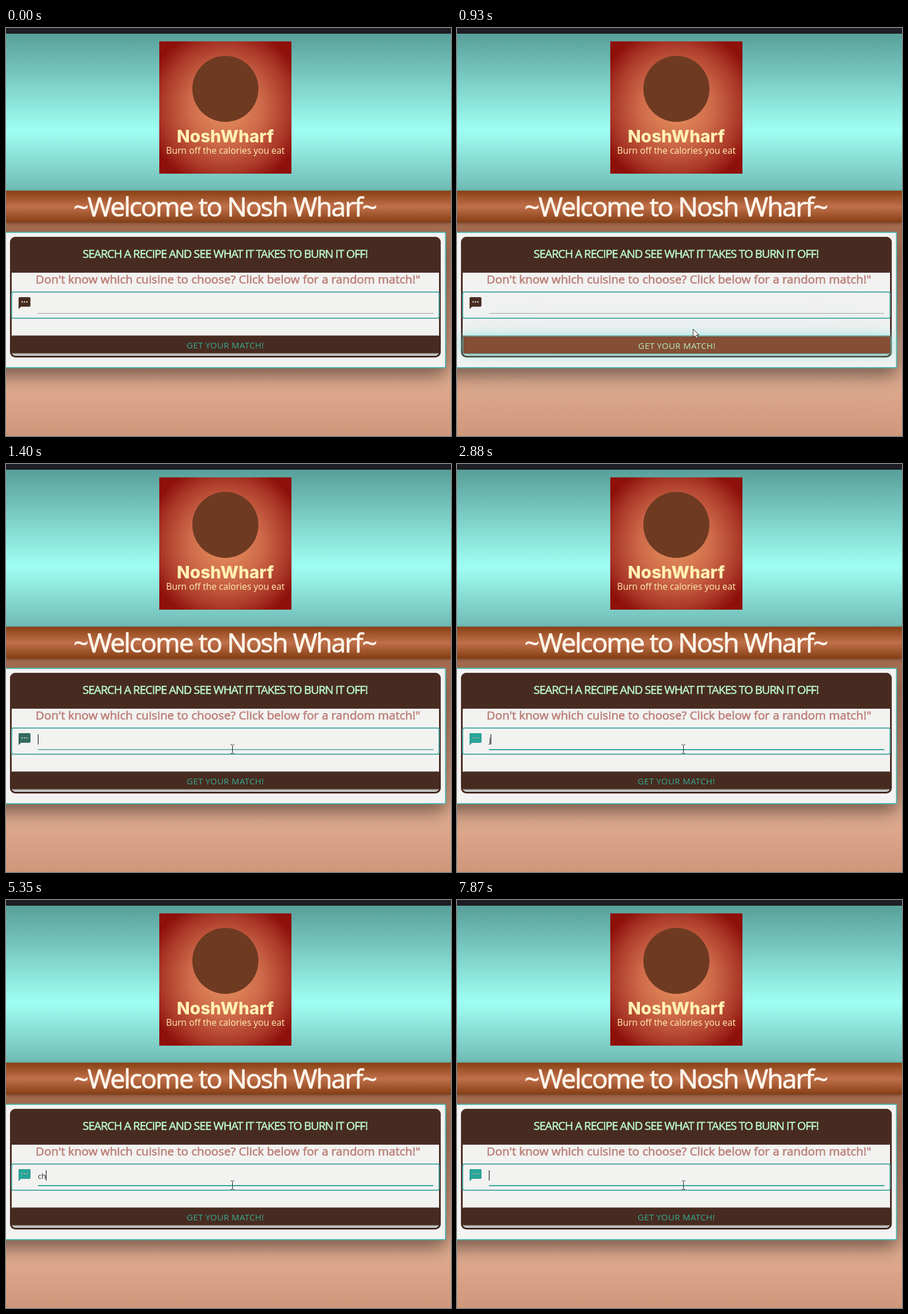
Recreate the animation shown at these times as an HTML page. Size 781 px wide and 717 px high, loop 8000 ms.

```html
<!DOCTYPE html>
<html lang="en">
<head>
<meta charset="utf-8">
<title>Recipe search</title>
<style>
  html, body { margin: 0; width: 100%; height: 100%; overflow: hidden; }
  body { position: relative; font-family: "Open Sans", "Noto Sans", sans-serif; }
  svg { display: block; }
  text { white-space: pre; }
  .mid { text-anchor: middle; }
  #pop {
    position: absolute; top: 443px; height: 30px; box-sizing: border-box;
    display: none; align-items: center; gap: 24px; padding: 0 13px 0 16px;
    border-radius: 5px; background: #f8f8f8; color: #1b1b1b;
    box-shadow: 0 2px 7px #0004; font-size: 11.6px; white-space: nowrap;
  }
  #pop small { font-size: 9px; }
</style>
</head>
<body>
<svg id="stage" width="781" height="717" viewBox="0 0 781 717">
  <defs>
    <linearGradient id="sky" x2="0" y2="1">
      <stop stop-color="#589f9a"/><stop offset=".615" stop-color="#a0fff4"/><stop offset="1" stop-color="#6fbab4"/>
    </linearGradient>
    <linearGradient id="bar" x2="0" y2="1">
      <stop stop-color="#884012"/><stop offset=".5" stop-color="#c0704b"/><stop offset="1" stop-color="#843e12"/>
    </linearGradient>
    <linearGradient id="clay" x2="0" y2="1">
      <stop stop-color="#a2694d"/><stop offset=".74" stop-color="#e1ac90"/><stop offset="1" stop-color="#cf967a"/>
    </linearGradient>
    <radialGradient id="ember" gradientUnits="userSpaceOnUse" cx="385" cy="140" r="142">
      <stop stop-color="#e8955f"/><stop offset=".45" stop-color="#ce6a4a"/>
      <stop offset=".78" stop-color="#ac3a29"/><stop offset="1" stop-color="#8e100b"/>
    </radialGradient>
    <filter id="soft" x="-30%" y="-50%" width="160%" height="200%"><feGaussianBlur stdDeviation="16"/></filter>
    <filter id="near" filterUnits="userSpaceOnUse" x="-80" y="440" width="940" height="240"><feGaussianBlur stdDeviation="11"/></filter>
    <filter id="far" filterUnits="userSpaceOnUse" x="-250" y="250" width="1300" height="600"><feGaussianBlur stdDeviation="65"/></filter>
    <filter id="thin" x="-5%" y="-30%" width="110%" height="180%"><feGaussianBlur stdDeviation="2"/></filter>
    <clipPath id="round"><circle cx="720" cy="524" r="17.5"/></clipPath>
    <path id="chat" transform="translate(20 471) scale(1.04)" d="M20 2H4c-1.1 0-2 .9-2 2v18l4-4h14c1.1 0 2-.9 2-2V4c0-1.1-.9-2-2-2zM9 11H7V9h2zm4 0h-2V9h2zm4 0h-2V9h2z"/>
  </defs>

  <!-- header -->
  <rect y="342" width="781" height="375" fill="url(#clay)"/>
  <rect y="10" width="781" height="276" fill="url(#sky)"/>
  <rect width="781" height="10" fill="#1c1e23"/>
  <rect x="269" y="23.5" width="232" height="232.5" fill="url(#ember)"/>
  <circle cx="385" cy="107" r="58" fill="#6e3a22"/>
  <g class="mid" fill="#fff0b3">
    <text x="385" y="201" font-family="Inter, sans-serif" font-weight="800" font-size="30">NoshWharf</text>
    <text x="385" y="221" font-size="15.8">Burn off the calories you eat</text>
  </g>
  <rect y="286" width="781" height="58" fill="#0004" filter="url(#thin)"/>
  <rect y="286" width="781" height="56" fill="url(#bar)"/>
  <text class="mid" x="384" y="331" font-size="46.3" letter-spacing="-2" fill="#fff7ec" stroke="#fff7ec" stroke-width=".9">~Welcome to Nosh Wharf~</text>

  <!-- card -->
  <rect x="-40" y="380" width="812" height="232" fill="#000" opacity=".45" filter="url(#soft)"/>
  <rect x="-9" y="359" width="780.5" height="238" rx="2" fill="#f3f3f2" stroke="#50b0aa" stroke-width="2"/>
  <rect x="8.5" y="368.5" width="753" height="209" rx="8" fill="#f2f2f1" stroke="#482a1f" stroke-width="3"/>
  <path d="M7 430V377a10 10 0 0 1 10-10H753a10 10 0 0 1 10 10V430z" fill="#482b20"/>
  <text class="mid" x="384.5" y="404" font-size="20" letter-spacing="-1" fill="#b9f6ca" stroke="#b9f6ca" stroke-width=".6">SEARCH A RECIPE AND SEE WHAT IT TAKES TO BURN IT OFF!</text>
  <text class="mid" x="389.5" y="449" font-size="20.65" fill="#bd8079" stroke="#bd8079" stroke-width=".7">Don't know which cuisine to choose? Click below for a random match!"</text>
  <rect x="10" y="464" width="750" height="46" rx="3" fill="none" stroke="#55aca6" stroke-width="2"/>
  <use href="#chat" fill="#482b20"/>
  <path d="M56 501.5H750" stroke="#9e9ea6"/>
  <g id="focus">
    <use href="#chat" fill="#26a69a"/>
    <path d="M56 502H750" stroke="#33a79c" stroke-width="2"/>
  </g>
  <text id="typed" x="56" y="490" font-size="13" fill="#222"></text>
  <path id="caret" d="M0 475V493" stroke="#000"/>

  <!-- button -->
  <rect x="10" y="543" width="751" height="31" rx="3" fill="#0006" filter="url(#thin)"/>
  <rect x="9" y="540.5" width="752" height="31" rx="3" fill="#482b20"/>
  <text id="label" class="mid" x="385" y="563" font-size="15" letter-spacing=".4" fill="#35ab92">GET YOUR MATCH!</text>
  <g id="hover">
    <rect x="10" y="541" width="752" height="31" fill="#a8d4ee" opacity=".28" filter="url(#far)"/>
    <rect x="10" y="541" width="752" height="31" fill="#74e6dc" opacity=".85" filter="url(#near)"/>
    <rect x="10.5" y="541.5" width="751" height="31" rx="3" fill="#8a5137" stroke="#5fbcae"/>
    <text class="mid" x="386" y="564" font-size="15" letter-spacing=".4" fill="#b9f6ca">GET YOUR MATCH!</text>
  </g>

  <!-- suggestion list -->
  <g id="list">
    <rect x="56" y="505" width="694" height="42" fill="#0006" filter="url(#thin)"/>
    <rect x="56" y="503" width="694" height="42.5" fill="#fff"/>
    <text x="69.5" y="529" font-size="14" stroke-width=".35"><tspan id="head" fill="#444" stroke="#444"></tspan><tspan id="tail" fill="#26a69a" stroke="#26a69a"></tspan></text>
    <g clip-path="url(#round)">
      <rect x="703" y="507" width="34" height="34" fill="none" stroke="#bbb" stroke-width="2"/>
      <path d="M705 509H716L720 513V523H705z" fill="#c9d9ee" stroke="#8c939b"/>
      <path d="M705 523L711 516L718 523z" fill="#4ca64c"/>
      <path d="M709 524L720 514V524z" fill="#fff"/>
    </g>
  </g>

  <path id="arrow" d="M0 0V14L3.3 11L5.6 16L8 15L5.8 10.2H10.2z" fill="#fff" stroke="#3b2a24"/>
  <path id="beam" d="M-3-7.5H-1L0-6.5L1-7.5H3M-3 7.5H-1L0 6.5L1 7.5H3M0-6.5V6.5" fill="none" stroke="#222"/>
</svg>
<div id="pop"></div>

<script>
const LOOP = 8000, CLICK = 1270, BLINK = 530;
const el = id => document.getElementById(id);
const islands = '<svg width="13" height="13"><path d="M1 11L4 9L8 8L10 4M10 3L12 1" fill="none" stroke="#3ccf8e" stroke-width="2.6"/></svg>';

const typing = [
  [0, ''], [2880, 'j'], [3080, 'ja'], [3280, 'jap'],
  [4540, 'ja'], [4680, 'j'], [4750, ''],
  [5280, 'c'], [5350, 'ch'], [5490, 'chi'], [5760, 'chin'],
  [6690, 'chi'], [6730, 'ch'], [6770, 'c'], [6810, '']
];
const hints = {
  ja: ['Japan', 'January'],
  jap: ['Japanese', 'Japan', islands],
  chi: ['China', 'child'],
  chin: ['Chinese', 'chin up', '<small>CN</small>']
};
const lists = [
  { open: 3330, close: 4680, word: 'Japanese' },
  { open: 5490, close: 6760, word: 'Chinese' }
];
const path = [[260, 480, 700], [430, 440, 575], [800, 420, 552], [930, 414, 529], [1110, 397, 501]];

const ramp = (t, a, b) => Math.min(1, Math.max(0, (t - a) / (b - a)));
const outQuint = p => 1 - (1 - p) ** 5;
const fade = (id, v) => el(id).setAttribute('opacity', v);
const place = (id, x, y) => el(id).setAttribute('transform', `translate(${x} ${y})`);

function drawField(t) {
  const [since, value] = typing.findLast(k => k[0] <= t);
  const last = Math.max(since, CLICK);
  el('typed').textContent = value;
  const x = 56 + (value ? el('typed').getComputedTextLength() : 0);
  place('caret', Math.round(x) + .5, 0);
  fade('caret', t >= CLICK && Math.floor((t - last) / BLINK) % 2 === 0 ? 1 : 0);
  fade('focus', ramp(t, CLICK, 1520));

  const words = hints[value], pop = el('pop');
  pop.style.display = words ? 'flex' : 'none';
  if (words) {
    pop.style.left = Math.round(x) + 'px';
    pop.innerHTML = words.map(w => `<span>${w}</span>`).join('');
  }
  drawList(t, Math.max(3, value.length));
}

function drawList(t, match) {
  const list = lists.find(l => t >= l.open && t < l.close + 250);
  fade('list', 0);
  if (!list) return;
  const shown = outQuint(ramp(t, list.open, list.open + 150)) - outQuint(ramp(t, list.close, list.close + 250));
  const size = .3 + .7 * shown;
  fade('list', shown);
  el('list').setAttribute('transform', `translate(56 503) scale(${size}) translate(-56 -503)`);
  el('head').textContent = list.word.slice(0, match);
  el('tail').textContent = list.word.slice(match);
}

function drawPointer(t) {
  const i = Math.min(path.length - 2, Math.max(0, path.findLastIndex(k => k[0] <= t)));
  const [a, b] = [path[i], path[i + 1]], p = ramp(t, a[0], b[0]);
  const x = a[1] + (b[1] - a[1]) * p, y = a[2] + (b[2] - a[2]) * p;
  const inField = y < 511;
  place('arrow', x + .5, y + .5);
  place('beam', Math.round(x) + .5, Math.round(y));
  fade('arrow', t >= 260 && !inField ? 1 : 0);
  fade('beam', inField ? 1 : 0);

  const hover = ramp(t, 400, 700) * (1 - ramp(t, 920, 1140));
  fade('hover', hover);
  fade('label', 1 - hover);
}

function frame(now) {
  const t = now % LOOP;
  drawField(t);
  drawPointer(t);
  requestAnimationFrame(frame);
}
frame(0);
</script>
</body>
</html>
```
